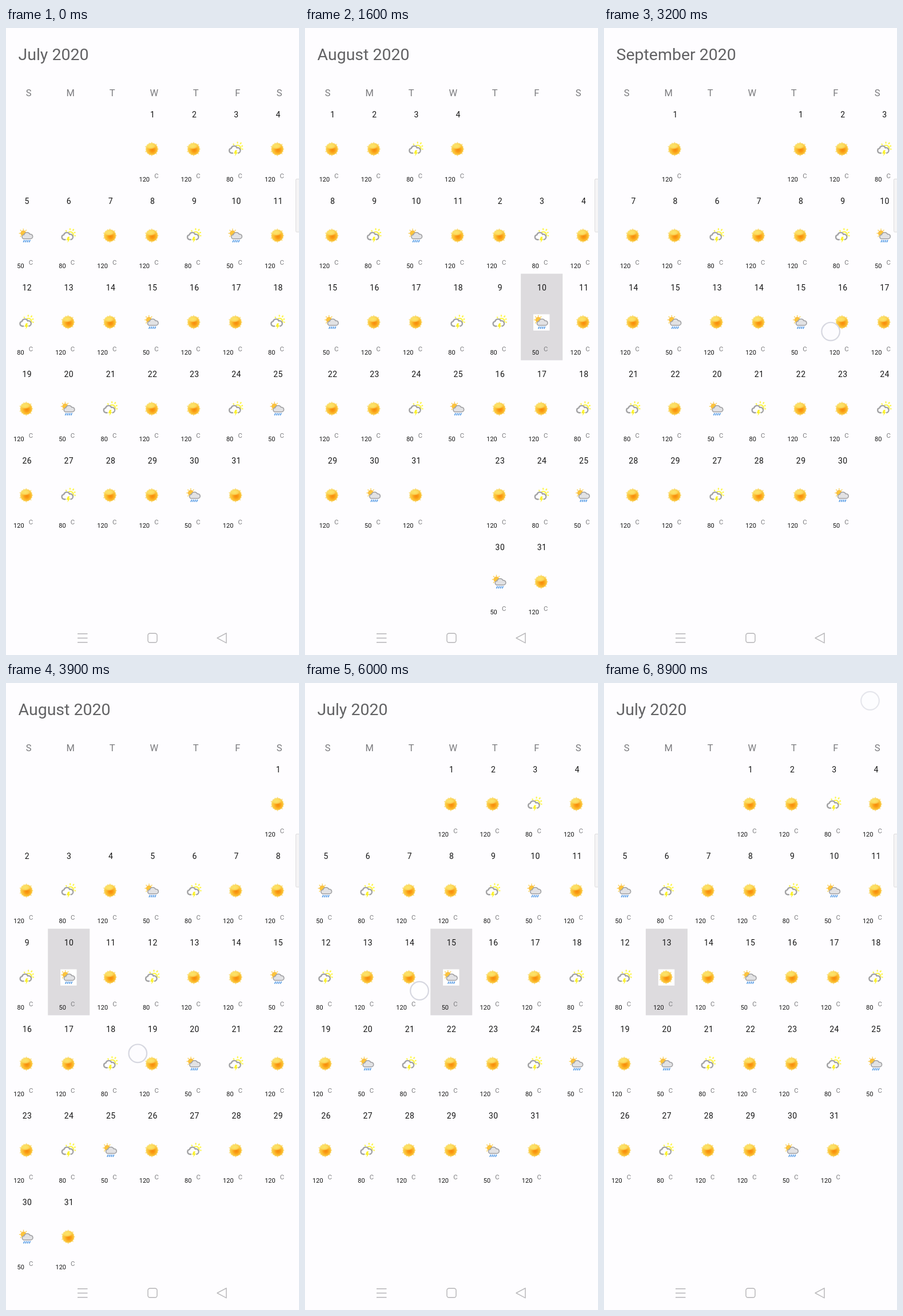
Recreate the animation shown at these times as an HTML page. Size 512 by 1094 pixels, loop 9000 ms.

```html
<!DOCTYPE html>
<html lang="en">
<head>
<meta charset="utf-8">
<title>Weather calendar</title>
<style>
  html, body { margin: 0; width: 100%; height: 100%; overflow: hidden; background: #fefdff; }
  svg { display: block; width: 512px; height: 1094px; font-family: Roboto, sans-serif; }
  .title { font-size: 28.5px; fill: #626264; }
  .week { font-size: 16.5px; fill: #7b7b7e; text-anchor: middle; }
  .day { font-size: 14px; letter-spacing: .4px; fill: #151515; text-anchor: middle; }
  .temp { font-size: 11px; fill: #151515; text-anchor: end; }
  .unit { font-size: 11.3px; fill: #7b7b7e; text-anchor: middle; }
</style>
</head>
<body>
<svg viewBox="0 0 512 1094">
  <defs>
    <radialGradient id="glow" cx=".56" cy=".57" r=".6">
      <stop offset="0" stop-color="#f78a0c"/>
      <stop offset=".3" stop-color="#f99c14"/>
      <stop offset=".55" stop-color="#fbb82c"/>
      <stop offset=".8" stop-color="#fbcb46"/>
      <stop offset="1" stop-color="#fadc68"/>
    </radialGradient>
    <radialGradient id="shine">
      <stop offset="0" stop-color="#fce668"/>
      <stop offset=".6" stop-color="#fce26a" stop-opacity=".8"/>
      <stop offset="1" stop-color="#fce26a" stop-opacity="0"/>
    </radialGradient>
    <g id="sun">
      <path id="rays" fill="#fbe396"/>
      <circle r="10.2" fill="url(#glow)"/>
      <ellipse cx="-1.5" cy="-5" rx="9" ry="5.5" fill="url(#shine)"/>
    </g>
    <g id="storm" fill="none" stroke-linecap="round">
      <path d="M1.5 -6A5.4 5.4 0 0 1 9.2 -.5" stroke="#fdf650" stroke-width="2.4"/>
      <path d="M-3.5 -8.5l.4 .5M3.5 -11.8v1.2M9.6 -10.6l-.9 1.2M12 -5.4l-.8 .3M12 .2h.4" stroke="#fdf650" stroke-width="2.4"/>
      <path d="M-5 7H-7A4.2 4.2 0 0 1 -7.5 -1.3A5.4 5.4 0 0 1 2.6 -2.2A4.6 4.6 0 0 1 5 7" stroke="#a2a2a4" stroke-width="2.4"/>
      <path d="M-.5 2H3L1.4 5.6H4L-1.2 12.5L0 8H-3Z" fill="#fbf12c"/>
    </g>
    <g id="rain">
      <path d="M-5 -11.5v1.4M-10 -9.5l1 1M0 -9.5l-1 1M-12 -4h1.4M-10 1.5l1 -1" stroke="#f9d25c" stroke-width="1.6" stroke-linecap="round"/>
      <circle cx="-5" cy="-4" r="4.6" fill="#fcc43a" stroke="#f6b038" stroke-width=".8"/>
      <path d="M-3.6 5.6A3.5 3.5 0 0 1 -3.8 -1.4A5.6 5.6 0 0 1 6.6 -2.4A4 4 0 0 1 8 5.6Z" fill="#e2e2e4" stroke="#a0a0a3" stroke-width="1.6"/>
      <path d="M-3 7.6l-2 4M.3 7.6l-2 4M3.6 7.6l-2 4M6.9 7.6l-2 4" stroke="#5c9fe6" stroke-width="1.8"/>
    </g>
  </defs>
  <rect width="512" height="1094" fill="#fefdff"/>
  <g id="pages"></g>
  <text id="title" class="title" x="21.5" y="56"></text>
  <g id="head"></g>
  <rect x="506.5" y="263.5" width="8" height="92.5" rx="1.5" fill="#f5f4f5" stroke="#dddcdd"/>
  <g fill="none" stroke="#b4b3b6" stroke-width="1.4" stroke-linejoin="round">
    <path d="M125 1057H142.5M125 1064.5H142.5M125 1072H142.5"/>
    <rect x="248" y="1056.3" width="16" height="16" rx="3.5"/>
    <path d="M369 1064.3L385 1055.8V1073Z"/>
  </g>
  <circle id="touch" r="15.8" fill="#fefdff" fill-opacity=".72" stroke="#d6d7e0" stroke-width="2.2"/>
</svg>
<script>
const LOOP = 9000, W = 512, COL = W / 7, ROW = 151, TOP = 127.5;
const NS = "http://www.w3.org/2000/svg";
const $ = id => document.getElementById(id);

const WEATHER = "SSTSRTSSTRSTSSRSSTSRTSSTRSTSSRS";
const KIND = { S: ["sun", 120], T: ["storm", 80], R: ["rain", 50] };
const MONTHS = [
  { name: "July 2020", first: 3, days: 31 },
  { name: "August 2020", first: 6, days: 31 },
  { name: "September 2020", first: 2, days: 30 }
];

// Swipes: start time, direction, finger start and vertical drift
const SWIPES = [
  { t: 1300, dir: 1, x: 400, y: 560, dy: -15 },
  { t: 2140, dir: 1, x: 405, y: 560, dy: -15 },
  { t: 2936, dir: -1, x: 235, y: 546, dy: -18 },
  { t: 3890, dir: -1, x: 230, y: 647, dy: -18 }
];
const DRAG = 290, SETTLE = 700, DRAGGED = 193;

// Taps: start, end, place, peak opacity, day chosen in July and when
const TAPS = [
  { t: 4860, end: 5080, x: 267, y: 525, a: 1, day: 15, at: 5050 },
  { t: 5900, end: 6140, x: 200, y: 537, a: 1, day: 14, at: 6100 },
  { t: 6950, end: 7220, x: 136, y: 550, a: 1, day: 13, at: 7150 },
  { t: 8000, end: 8220, x: 464, y: 23, a: .6 },
  { t: 8640, end: 9100, x: 465, y: 31, a: .6 }
];

function add(parent, tag, attrs, text) {
  const el = document.createElementNS(NS, tag);
  for (const k in attrs) el.setAttribute(k, attrs[k]);
  if (text !== undefined) el.textContent = text;
  parent.appendChild(el);
  return el;
}

function cellAt(month, day) {
  const n = month.first + day - 1;
  return [n % 7 * COL, TOP + Math.floor(n / 7) * ROW];
}

function buildMonth(month) {
  month.page = add($("pages"), "g", {});
  month.mark = add(month.page, "g", {});
  add(month.mark, "rect", { x: -.2, y: -.8, width: 73, height: ROW, fill: "#dddbde" });
  add(month.mark, "rect", { x: 21.7, y: 70, width: 28.4, height: 28.4, fill: "#fff" });
  for (let d = 1; d <= month.days; d++) {
    const [x, y] = cellAt(month, d);
    const [icon, temp] = KIND[WEATHER[d - 1]];
    const cell = add(month.page, "g", { transform: `translate(${x} ${y})` });
    add(cell, "text", { class: "day", x: 36.7, y: 28.5 }, d);
    add(cell, "use", { href: "#" + icon, x: 35.3, y: 83.7 });
    add(cell, "text", { class: "temp", x: 31.6, y: 140.5 }, temp);
    add(cell, "text", { class: "unit", x: 43.4, y: 134.5 }, "C");
  }
}

function mark(month, day) {
  month.mark.style.display = day ? "" : "none";
  if (day) month.mark.setAttribute("transform", `translate(${cellAt(month, day)})`);
}

const dragDist = dt => DRAGGED * (dt / DRAG) ** 2;

function travel(dt) {
  if (dt <= 0) return 0;
  if (dt < DRAG) return dragDist(dt);
  const left = 1 - Math.min(1, (dt - DRAG) / SETTLE);
  return W - (W - DRAGGED) * left ** 3;
}

function fingerAt(t) {
  for (const s of SWIPES) {
    const dt = t - s.t;
    if (dt >= 0 && dt < DRAG)
      return { x: s.x - s.dir * dragDist(dt), y: s.y + s.dy * dt / DRAG, a: 1 };
  }
  for (const p of TAPS) {
    if (t >= p.t && t < p.end + 60)
      return { x: p.x, y: p.y, a: p.a * Math.min(1, (p.end + 60 - t) / 60) };
  }
  return null;
}

function draw(t) {
  let scroll = 0, shown = 0, chosen = 0;
  for (const s of SWIPES) {
    scroll += s.dir * travel(t - s.t);
    if (t >= s.t + DRAG) shown += s.dir;
  }
  for (const p of TAPS) if (p.day && t >= p.at) chosen = p.day;

  MONTHS.forEach((m, i) => {
    const x = i * W - scroll;
    m.page.setAttribute("transform", `translate(${x.toFixed(2)} 0)`);
    m.page.style.display = Math.abs(x) < W ? "" : "none";
  });
  mark(MONTHS[0], chosen);
  $("title").textContent = MONTHS[shown].name;

  const f = fingerAt(t), touch = $("touch");
  touch.style.display = f ? "" : "none";
  if (f) {
    touch.setAttribute("cx", f.x);
    touch.setAttribute("cy", f.y);
    touch.setAttribute("opacity", f.a);
  }
}

let star = "";
for (let i = 0; i < 32; i++) {
  const a = i * Math.PI / 16, r = i % 2 ? 10.4 : 12.2 + Math.sin(i * 5);
  star += `${i ? "L" : "M"}${(r * Math.cos(a)).toFixed(1)} ${(r * Math.sin(a)).toFixed(1)}`;
}
$("rays").setAttribute("d", star + "Z");
[..."SMTWTFS"].forEach((c, i) => add($("head"), "text", { class: "week", x: 39.7 + i * 73, y: 119 }, c));
MONTHS.forEach(buildMonth);
mark(MONTHS[1], 10);
mark(MONTHS[2], 0);

const start = performance.now();
function tick() {
  draw((performance.now() - start) % LOOP);
  requestAnimationFrame(tick);
}
tick();
</script>
</body>
</html>
```
